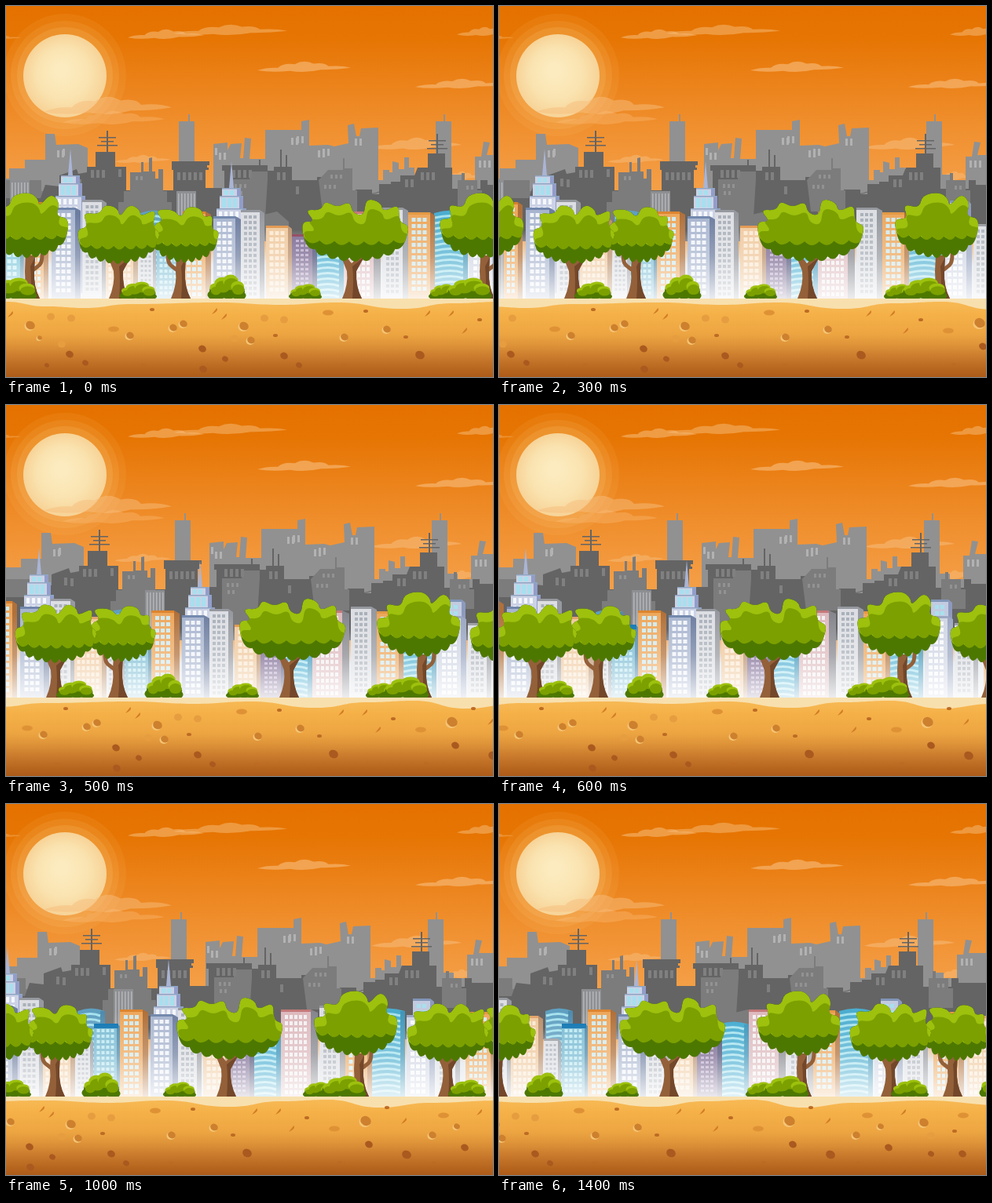
Write an HTML page with a canvas that moves like this. It is 620 px wide and 473 px high and loops after 1500 ms.

```html
<!DOCTYPE html>
<html lang="en">
<head>
<meta charset="utf-8">
<title>City parallax</title>
<style>
html, body { margin: 0; width: 100%; height: 100%; overflow: hidden; }
#stage { position: relative; width: 620px; height: 473px; overflow: hidden; background: #e67300; }
canvas { position: absolute; left: 0; top: 0; display: block; }
</style>
</head>
<body>
<div id="stage"></div>
<script>
const H = 473, STEPS = 15, LOOP = 1500, TILE = 579;
const stage = document.getElementById('stage');

// Adds a layer that moves left by `speed` pixels every 100 ms.
function layer(speed, paint) {
  const c = document.createElement('canvas');
  c.width = 620 + speed * STEPS;
  c.height = H;
  paint(c.getContext('2d'), c.width);
  stage.append(c);
  if (speed) c.animate(
    [{ transform: 'translateX(0)' }, { transform: `translateX(${-speed * STEPS}px)` }],
    { duration: LOOP, iterations: Infinity, easing: `steps(${STEPS}, end)` });
}

function fade(g, y0, y1, stops) {
  const f = g.createLinearGradient(0, y0, 0, y1);
  stops.forEach(([at, col]) => f.addColorStop(at, col));
  return f;
}
function shape(g, col, d) { g.fillStyle = col; g.fill(new Path2D(d)); }
function rect(g, col, x, y, w, h) { g.fillStyle = col; g.fillRect(x, y, w, h); }
function oval(g, col, x, y, rx, ry = rx, turn = 0) {
  g.fillStyle = col;
  g.beginPath();
  g.ellipse(x, y, rx, ry, turn, 0, 7);
  g.fill();
}
function slits(g, col, w, h, spots) {
  for (const [x, y, n = 2, gap = w + 3] of spots)
    for (let i = 0; i < n; i++) rect(g, col, x + i * gap, y, w, h);
}

/* ---- sky ---- */
function cloud(g, x, y, w, h, alpha) {
  const p = (u, v) => `${x + u * w} ${y + v * h} `;
  shape(g, `rgba(248,190,125,${alpha})`,
    'M' + p(0, .85) + 'Q' + p(.1, .55) + p(.22, .6) + 'Q' + p(.28, .1) + p(.4, .25) +
    'Q' + p(.5, -.25) + p(.6, .2) + 'Q' + p(.72, .05) + p(.76, .45) +
    'Q' + p(.9, .35) + p(1, .6) + 'Q' + p(.85, .8) + p(.68, .78) +
    'Q' + p(.5, 1.15) + p(.35, .9) + 'Q' + p(.15, 1.1) + p(0, .85) + 'Z');
}
layer(0, (g, w) => {
  rect(g, fade(g, 0, 260, [[0, '#e57200'], [.16, '#e67503'], [.36, '#eb8118'],
    [.6, '#f0902f'], [.8, '#f39a40'], [1, '#f5a44e']]), 0, 0, w, H);
  [[78, .07], [69, .09], [61, .12]].forEach(([r, a]) => oval(g, `rgba(255,225,160,${a})`, 75, 88, r));
  const sun = g.createRadialGradient(70, 82, 8, 75, 89, 53);
  sun.addColorStop(0, '#fcebbf');
  sun.addColorStop(.55, '#fae3b0');
  sun.addColorStop(1, '#f7d397');
  oval(g, sun, 75, 89, 53);
  [[155, 30, 97, 12, .55], [213, 24, 145, 13, .5], [320, 71, 119, 13, .6],
   [521, 93, 118, 12, .6], [574, 27, 70, 11, .5], [-40, 37, 59, 6, .4],
   [48, 116, 163, 22, .5], [72, 134, 130, 17, .35], [138, 190, 72, 10, .5],
   [465, 168, 115, 15, .55], [555, 211, 50, 11, .5]].forEach(c => cloud(g, ...c));
});

/* ---- ruins ---- */
layer(1, g => {
  shape(g, '#919191', 'M0 260V220H4V207H24V196H50V163H62L64 177 92 176 104 181V240H220V147H232V138H234V147H240V240' +
    'H264V176L282 174V184L286 176 300 175 298 194H302L304 168 312 169 310 195H330V158H376V147L386 145V178' +
    'L410 177 418 179 436 175 435 152 443 150 446 166H450L452 156 474 155V222H480V209H488V212H492V198L500 200V208' +
    'H507V193H513V206H520V240H547V147H557V138H559V147H567V215H580V222H597V192H605L608 173 616 174 612 190H640V260Z');
  slits(g, '#b2b2b2', 3, 9, [[65, 184], [72, 182, 1], [266, 181, 1], [271, 187], [363, 168], [370, 166],
    [397, 184], [403, 182], [444, 169], [602, 197, 3]]);
});

function mast(g, x, y) {
  [[22, 8], [16, 13], [26, 18]].forEach(([w, dy]) => rect(g, '#646464', x - w / 2, y + dy, w, 1.5));
}
layer(2, g => {
  shape(g, '#7c7c7c', 'M0 300V222H45V236H62V300Z');
  shape(g, '#646464', 'M0 300V245H44L50 228 68 230V216L90 208 92 214 103 212V205H114V186H128V159H130V186H139V205H153V235' +
    'H213V209H211V198H259V203H256V206H258V209H254V232H278V210H275V203H322V196H324V203H333V210H341V205H349V183H351V205' +
    'H356V190H358V205H364V222H396V218H412V236H445V234H466V240H475V227H490V224H502V216H520L524 206H537V188H548V163H550V188' +
    'H559V206H568V233H604V222H613V228H660V300Z');
  shape(g, '#7c7c7c', 'M143 300V250H150V236H158V212H172V199H175V211H182V194L186 193V211H190V220H194V208H200V236H205V250H211V270H200V300Z' +
    'M285 300V221H310V211H333V222L328 300ZM403 262L398 222 410 209H429V194H431V207H441V235H447V262Z' +
    'M575 260V222H580V213H584V222H600V235H606V260ZM320 300V268L345 262 360 275V300Z');
  mast(g, 129, 159);
  mast(g, 549, 163);
  g.strokeStyle = '#646464';
  g.beginPath();
  g.moveTo(447, 238);
  g.quadraticCurveTo(462, 243, 478, 236);
  g.stroke();
  slits(g, '#808080', 4, 10, [[108, 209, 3], [143, 208, 1], [84, 220, 1], [92, 221, 1], [218, 212, 5],
    [288, 209, 4], [345, 212], [369, 230, 1], [508, 221], [528, 212, 3]]);
  slits(g, '#929292', 3, 5, [[165, 217, 2], [291, 227, 3], [292, 236, 2], [413, 215, 3], [405, 228, 3], [586, 229, 2]]);
});

/* ---- skyline ---- */
function house(g, x, w, side, top, wall, shade, pane, cell = [7, 8], roof = shade) {
  rect(g, wall, x, top, w, 373 - top);
  if (side) shape(g, shade, `M${x + w} ${top}l${side} 4V373H${x + w}Z`);
  rect(g, roof, x, top, w, 3);
  const [cx, cy] = cell, n = Math.floor((w - 3) / cx), pad = (w - n * cx + 2) / 2;
  for (let y = top + 7; y < 366; y += cy)
    for (let i = 0; i < n; i++) rect(g, pane, x + pad + i * cx, y, cx - 2, cy - 3);
}
function drum(g, x, w, top, wall) {
  shape(g, wall, `M${x} 373V${top + 2}Q${x + w / 2} ${top - 5} ${x + w} ${top + 2}V373Z`);
  g.strokeStyle = '#a5e2ee';
  g.lineWidth = 3;
  for (let y = top + 8; y < 372; y += 7) {
    g.beginPath();
    g.moveTo(x + 1, y);
    g.quadraticCurveTo(x + w / 2, y - 5, x + w - 6, y);
    g.stroke();
  }
  rect(g, 'rgba(30,80,120,.25)', x + w - 6, top + 2, 6, 371 - top);
}
function spire(g, x, y) {
  shape(g, '#aab4d4', `M${x} ${y - 34}l3 34h-6Z`);
  [[24, 0, 10], [30, 10, 16], [38, 26, 340 - y]].forEach(([w, dy, h]) => {
    rect(g, '#ccd2e6', x - w / 2, y + dy, w, h);
    rect(g, '#929dca', x + w / 2 - 5, y + dy, 5, h);
    rect(g, '#8fa6c4', x - w / 2, y + dy, w, 1.5);
  });
  slits(g, '#a6e0ef', 5, 6, [[x - 9, y + 3, 2, 7], [x - 12, y + 13, 3, 7], [x - 12, y + 19, 3, 7]]);
  slits(g, '#f4f7fb', 4, 7, [[x - 16, y + 30, 4, 7], [x - 16, y + 40, 4, 7]]);
}
function slab(g, x, top) {
  rect(g, '#8d8f92', x, top, 25, 373 - top);
  for (let i = 2; i < 24; i += 4) rect(g, '#b3b5b8', x + i, top + 3, 1.5, 373 - top);
}
layer(8, (g, w) => {
  const white = ['#dcdee3', '#96999f', '#a9b0b9'], orange = ['#eda75c', '#b0703a', '#cfeaf0'],
        tan = ['#efc79b', '#b88d68', '#fae9d2'], steel = ['#a8b5cf', '#6d7d9f', '#f1f4f9'];
  rect(g, fade(g, 285, 330, [[0, 'rgba(222,228,234,0)'], [1, '#dee4ea']]), 0, 285, w, 88);
  slab(g, 5, 222);
  slab(g, 217, 236);
  house(g, -10, 28, 4, 300, '#79c5da', '#5b91ab', '#c9eff4');
  house(g, 30, 18, 6, 250, ...orange, [6, 8], '#d8812f');
  spire(g, 82, 216);
  house(g, 97, 25, 6, 247, ...white, [6, 7]);
  house(g, 58, 30, 7, 257, ...steel, [7, 8], '#7187ac');
  drum(g, 171, 35, 262, '#5f9fc0');
  house(g, 127, 35, 6, 270, ...tan, [6, 8], '#e0a269');
  house(g, 169, 18, 4, 299, ...white, [5, 6]);
  house(g, 192, 29, 5, 280, '#77b9d2', '#4d87a7', '#bde9f1', [6, 7], '#0871b0');
  rect(g, '#0871b0', 192, 280, 31, 6);
  spire(g, 287, 232);
  house(g, 225, 29, 7, 262, ...orange, [7, 8], '#dd8530');
  house(g, 264, 28, 7, 268, ...steel, [7, 8], '#7187ac');
  house(g, 299, 24, 6, 260, ...white, [6, 7]);
  drum(g, 392, 38, 279, '#3fa9cf');
  house(g, 364, 26, 6, 291, '#77658e', '#474b73', '#b8a7ca', [6, 6], '#84344f');
  house(g, 331, 28, 5, 280, ...tan, [7, 8], '#e09246');
  house(g, 430, 38, 9, 262, '#ddb9bd', '#85868d', '#f3f0f1', [6, 8], '#c5797a');
  house(g, 479, 26, 7, 257, ...white, [6, 7]);
  drum(g, 545, 43, 262, '#4badcf');
  house(g, 512, 28, 6, 263, ...orange, [7, 8], '#e49a45');
  house(g, 598, 22, 5, 248, '#c2cbe0', '#8d99bd', '#a8e0ed', [7, 8], '#8195b7');
  house(g, 590, 29, 7, 269, '#cfd5e3', '#99a5c1', '#f7f9fb', [7, 8]);
  house(g, 628, 24, 6, 278, ...white, [6, 7]);
  house(g, 665, 32, 7, 265, ...orange, [6, 8], '#e49a45');
  house(g, 708, 34, 6, 270, ...tan, [6, 8], '#e0a269');
  g.globalCompositeOperation = 'source-atop';
  rect(g, fade(g, 265, 373, [[0, 'rgba(255,255,255,0)'], [.5, 'rgba(255,255,255,.28)'],
    [1, 'rgba(255,255,255,.85)']]), 0, 265, w, 108);
});

/* ---- ground ---- */
function chip(g, x, y, size) {
  shape(g, '#d27c26', `M${x - size} ${y + size}L${x + size * .6} ${y - size}q${size * .7} ${size}-${size * 1.6} ${size * 2}Z`);
}
layer(22, (g, w) => {
  rect(g, fade(g, 373, H, [[0, '#f8bb58'], [.2, '#f5b148'], [.45, '#eda542'], [.6, '#dd9238'],
    [.75, '#c97a2c'], [.9, '#b7661f'], [1, '#ad5b19']]), 0, 373, w, 100);
  const edge = [[0, 377], [50, 383], [100, 385], [160, 380], [270, 378], [350, 381], [420, 378], [505, 386],
    [570, 379], [630, 377], [695, 387], [760, 381], [850, 378], [950, 384]];
  g.fillStyle = '#f8e0ae';
  g.beginPath();
  g.moveTo(0, 373);
  g.lineTo(0, 377);
  edge.slice(0, -1).forEach(([x, y], i) => {
    const [nx, ny] = edge[i + 1], m = (x + nx) / 2;
    g.bezierCurveTo(m, y, m, ny, nx, ny);
  });
  g.lineTo(950, 373);
  g.fill();
  const pale = [[57, 396], [83, 398], [329, 398], [354, 400], [291, 424], [71, 431], [858, 423]];
  const flat = [[410, 391], [638, 414], [777, 397], [899, 397], [137, 412]];
  const stone = [[31, 407, 6], [158, 420, 5], [213, 410, 5], [226, 405, 5], [303, 408, 6], [312, 426, 5],
    [431, 422, 5], [485, 412, 5], [678, 404, 7], [763, 422, 5], [849, 406, 6], [43, 423, 3], [794, 411, 4]];
  const dark = [[81, 444, 5], [101, 455, 4], [250, 437, 5], [279, 450, 4], [354, 446, 5], [373, 458, 4],
    [527, 445, 6], [251, 463, 5], [52, 458, 3], [682, 434, 5], [730, 447, 6], [804, 438, 5], [858, 446, 4], [898, 446, 5]];
  const dots = [[186, 387], [343, 420], [458, 389], [509, 422], [603, 400], [705, 387], [888, 417],
    [175, 458], [430, 458], [645, 457], [765, 458]];
  pale.forEach(([x, y]) => oval(g, '#e69d40', x, y, 5, 4.5));
  flat.forEach(([x, y]) => oval(g, '#df9235', x, y, 7, 3.5));
  stone.forEach(([x, y, r]) => {
    oval(g, '#f6c576', x - 1, y + 1, r + .5, r);
    oval(g, '#cd802d', x, y, r, r * .85, .5);
  });
  dark.forEach(([x, y, r]) => oval(g, '#aa591f', x, y, r, r * .85, .5));
  dots.forEach(([x, y]) => oval(g, '#bd6b24', x, y, 3, 2));
  [[6, 393], [266, 389], [278, 396], [537, 392], [567, 392], [584, 414], [727, 404], [823, 393]]
    .forEach(([x, y]) => chip(g, x, y, 4));
});

/* ---- trees ---- */
const LIGHT = '#9dc10d', MID = '#7ca000', DEEP = '#4d7800';

// Leaf outline: smooth top through pts, scalloped underside from end to start.
function leaves(g, pts, sag, n) {
  const [x0, y0] = pts[0], [x1, y1] = pts[pts.length - 1];
  g.beginPath();
  g.moveTo(x0, y0);
  for (let i = 1; i < pts.length - 1; i++) {
    const [x, y] = pts[i], [nx, ny] = pts[i + 1];
    const last = i === pts.length - 2;
    g.quadraticCurveTo(x, y, last ? nx : (x + nx) / 2, last ? ny : (y + ny) / 2);
  }
  let px = x1, py = y1;
  for (let i = 1; i <= n; i++) {
    const t = i / n, x = x1 + (x0 - x1) * t;
    const y = y1 + (y0 - y1) * t + sag * Math.sqrt(Math.max(0, Math.sin(Math.PI * t)));
    g.quadraticCurveTo((px + x) / 2 + (t - .5) * -6, (py + y) / 2 + 10, x, y);
    px = x;
    py = y;
  }
  g.closePath();
}
function crown(g, pts, low) {
  const base = pts[0][1], sag = low - base - 5;
  g.save();
  leaves(g, pts, sag, 9);
  g.fillStyle = DEEP;
  g.fill();
  g.clip();
  [[0, 0, LIGHT], [2, 12, MID]].forEach(([dx, dy, col]) => {
    leaves(g, pts.map(([x, y]) => [x + dx, Math.min(y + dy, base + 2)]), sag * .15, 7);
    g.fillStyle = col;
    g.fill();
  });
  g.restore();
}
function trunk(g, x, arm, wide) {
  const wood = '#936039';
  g.strokeStyle = wood;
  g.lineWidth = 5;
  if (arm) {
    g.beginPath();
    g.moveTo(x, 342);
    g.bezierCurveTo(x + arm * 8, 328, x + arm * 17, 338, x + arm * 16, 312);
    g.stroke();
  }
  const l = wide ? 14 : 5;
  shape(g, wood, `M${x - 12} 373Q${x - 4} 355 ${x - 6} 338L${x - l} 318H${x - l + 6}L${x} 328 ${x + l - 4} 318H${x + l + 2}` +
    `L${x + 6} 338Q${x + 5} 358 ${x + 13} 373Z`);
  shape(g, '#73472a', `M${x + 1} 373Q${x + 3} 350 ${x + 1} 332L${x + l + 2} 320 ${x + 6} 338Q${x + 5} 358 ${x + 13} 373Z`);
}
function bush(g, x, w, top) {
  const h = 373 - top, ball = (col, u, v, r) => oval(g, col, x + u * w, 373 - v * h, r * w, r * h * 1.3);
  g.save();
  g.beginPath();
  g.rect(x - w, 0, w * 2, 373);
  g.clip();
  [[-.36, .15, .14], [-.2, .3, .25], [.05, .35, .28], [.25, .28, .22], [.38, .12, .12]].forEach(b => ball(DEEP, ...b));
  [[-.3, .45, .14], [-.12, .62, .2], [.1, .72, .2], [.28, .5, .17]].forEach(([u, v, r]) => {
    ball(LIGHT, u, v, r);
    ball(MID, u + .02, v - .13, r * .95);
  });
  g.restore();
}
const trees = [
  { x: 222, arm: -1, low: 327, top: [[186, 296], [187, 278], [201, 274], [189, 260], [213, 259], [223, 271], [230, 255],
    [249, 258], [251, 270], [264, 266], [261, 285], [273, 287], [269, 297]] },
  { x: 143, wide: 1, low: 329, top: [[93, 300], [89, 285], [105, 282], [97, 263], [119, 266], [125, 253], [142, 257],
    [145, 270], [157, 252], [171, 260], [171, 269], [192, 258], [186, 282], [198, 290], [192, 300]] },
  { x: 440, wide: 1, low: 326, top: [[379, 294], [374, 274], [394, 276], [380, 259], [401, 261], [406, 248], [421, 257],
    [438, 249], [441, 264], [456, 268], [458, 245], [477, 250], [480, 263], [501, 252], [500, 276], [515, 280], [510, 294]] },
  { x: 609, arm: 1, low: 321, top: [[554, 287], [549, 271], [569, 272], [562, 252], [583, 258], [587, 241], [609, 237],
    [620, 246], [621, 256], [637, 238], [648, 252], [642, 268], [661, 271], [657, 288]] }
];
const bushes = [[168, 48, 351], [281, 49, 342], [381, 42, 354], [557, 38, 354], [589, 59, 346]];

layer(16, g => {
  for (let k = -1; k < 2; k++) {
    g.save();
    g.translate(k * TILE, 0);
    trees.forEach(t => trunk(g, t.x, t.arm, t.wide));
    trees.forEach(t => crown(g, t.top, t.low));
    bushes.forEach(b => bush(g, ...b));
    g.restore();
  }
});
</script>
</body>
</html>
```
